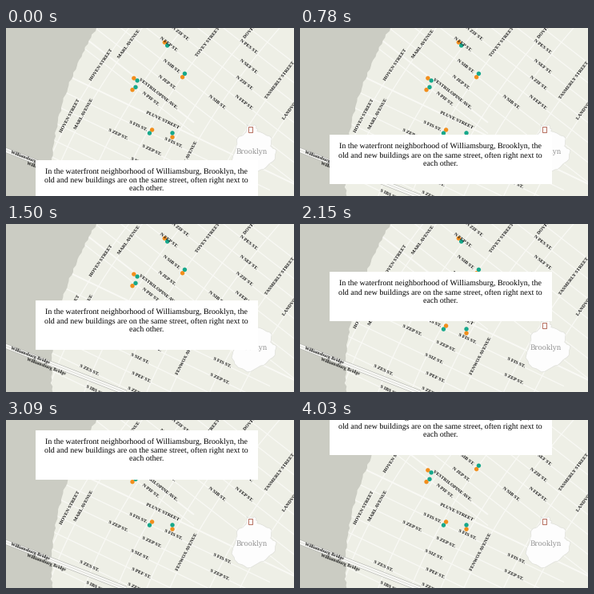
Recreate the animation shown at these times as a matplotlib script. Size 360x211 px, loop 4.05 s.

```python
import math

import numpy as np
import matplotlib.pyplot as plt
from matplotlib.animation import FuncAnimation
from matplotlib.patches import Circle, Polygon, Rectangle

W, H, DPI = 360, 211, 100
LOOP, TICK, STEPS = 4050, 10, 56
PX = 72 / DPI

LAND, WATER, ROAD, INK = "#eeefe6", "#cbccc3", "#f9f9f5", "#1a1a1a"
ORANGE, TEAL = "#f28e1c", "#17a88b"

plt.rcParams["text.hinting"] = "none"
rng = np.random.default_rng(4)
fig = plt.figure(figsize=(W / DPI, H / DPI), dpi=DPI, facecolor=LAND)
ax = fig.add_axes([0, 0, 1, 1])
ax.set_xlim(0, W)
ax.set_ylim(H, 0)
ax.axis("off")


def line(x, y, color=ROAD, width=1.3, z=1):
    ax.plot(x, y, color=color, lw=width * PX, zorder=z,
            solid_capstyle="butt")


def label(text, x, y, angle=0, size=6.0, family="Liberation Serif",
          weight="bold", color=INK, z=5):
    ax.text(x, y, text, rotation=angle, size=size * PX, family=family,
            weight=weight, color=color, ha="center", va="center",
            rotation_mode="anchor", zorder=z)


def avenue_x(u, y):
    """Avenues share one bend and fan out with their distance u inland."""
    return 153.5 - 0.77 * y + 0.00103 * y**2 + u * (39 - 0.02 * y)


def avenue(u, name="", ys=()):
    y = np.linspace(-5, H + 5, 30)
    line(avenue_x(u, y), y)
    for at in ys:
        run = avenue_x(u, at - 0.5) - avenue_x(u, at + 0.5)
        label(name, avenue_x(u, at), at, math.degrees(math.atan2(1, run)))


def street(slope, base, name, xs, start, end, width=1.3):
    x = np.array([start, end])
    line(x, base + slope * x, width=width)
    for at in xs:
        label(name, at, base + slope * at, -math.degrees(math.atan(slope)))


def north(lane, name="", xs=(), start=80, end=365, width=1.3):
    street(0.78, -12 - 25 * lane, name, xs, start, end, width)


def south(lane, name="", xs=(), end=330, width=1.3):
    street(0.48, 23 + 22.3 * lane, name, xs, 40, end, width)


avenue(0, "HOVEN STREET", [47, 111])
avenue(0.43, "MARL AVENUE", [21, 108])
avenue(1.75)
avenue(2.92, "TOVEY STREET", [18])
avenue(4.0, "DOVFELD AVENUE", [-8])
avenue(4.83, "FENWOX AVENUE", [166])
avenue(6.26, "TASMERLY STREET", [66])
avenue(7.35, "LANDVOKER STREET", [89])

north(1.55, "N PIF ST.", [180], 95, 235)
north(2.1, "VESTRILOPINE AVE.", [190], 95, 235, 2)
north(3, "N JEP ST.", [200])
north(4, "N SIB ST.", [206, 263])
north(5, "N FEP ST.", [202, 296])
north(6, "N ZIF ST.", [217, 297])
north(7, "N SEF ST.", [302])
north(8, "N PES ST.", [302])
north(9)

south(0, "PLUVE STREET", [195], 365, 2)
south(1, "S FIS ST.", [164, 208, 269])
south(2, "S ZEP ST.", [139, 181, 266])
south(3, "S SIZ ST.", [167])
south(4, "S PEF ST.", [168])
south(5, "S ZES ST.", [103, 163])
south(6, "S IBS ST.", [111])

# River with a ragged bank
bank_y = np.arange(-4, H + 5, 4)
bank_x = 113 - 0.6 * bank_y + 0.0016 * bank_y**2
bank_x += rng.uniform(-1.3, 1.3, bank_y.size)
bank = [(0, -4), *zip(bank_x, bank_y), (0, H + 4)]
ax.add_patch(Polygon(bank, fc=WATER, ec="none", zorder=2))

# Bridge
deck = np.array([-2, 165])
for color, width in [("#b4b5b0", 6.4), ("#f8f8f5", 5.2), ("#d3d4cf", 0.7)]:
    line(deck, 153.5 + 0.39 * deck, color, width, 3)
for x, y in [(30, 165), (50.5, 179)]:
    label("Williamsburg Bridge", x, y, -21, 5.8)

# Building pairs: centre and direction from the orange dot to the teal one
PAIRS = [(200, 20, 50), (222, 59.5, -57), (162, 64.5, 35),
         (160, 76, -40), (181, 130, 127), (208, 134.5, -90)]
for x, y, angle in PAIRS:
    a = math.radians(angle)
    for side, color in [(-1, ORANGE), (1, TEAL)]:
        spot = x + side * 2.6 * math.cos(a), y + side * 2.6 * math.sin(a)
        ax.add_patch(Circle(spot, 2.7, fc=color, ec="none", zorder=4))

# Locator inset: a few corners joined by a ragged coast
CORNERS = np.array([(301, 122), (311, 122), (315, 130), (332, 138),
                    (331, 149), (338, 153), (336, 166), (320, 178),
                    (303, 186), (288, 178), (281, 168), (287, 150),
                    (290, 137), (300, 132), (301, 122)])
t = np.linspace(0, len(CORNERS) - 1, 4 * len(CORNERS))
coast = np.column_stack([np.interp(t, range(len(CORNERS)), c)
                         for c in CORNERS.T])
coast += rng.uniform(-0.9, 0.9, coast.shape)
ax.add_patch(Polygon(coast, fc="#fdfdfd", ec="#dcddd7", lw=0.6 * PX,
                     zorder=6))
ax.add_patch(Rectangle((302.5, 123.5), 5, 7, fc="none", ec="#b0614f",
                       lw=0.9 * PX, zorder=7))
label("Brooklyn", 307, 156, 0, 8.7, "DejaVu Serif", "normal", "#929292", 7)

# Caption card
CAPTION = ["In the waterfront neighborhood of Williamsburg, Brooklyn, the",
           "old and new buildings are on the same street, often right next to",
           "each other."]
card = ax.add_patch(Rectangle((37, 165), 278, 62, fc="white", ec="none",
                              zorder=8))
rows = [ax.text(175.3, 0, row, size=10 * PX, family="Liberation Serif",
                color="black", ha="center", va="baseline", zorder=9)
        for row in CAPTION]


def card_top(step):
    return np.interp(step, [0, 6, 16, 21, 30, 43, 56],
                     [165.5, 148.5, 120, 96, 60, 12.5, -18])


def update(i):
    # The page redraws in discrete scroll steps
    step = (i * TICK + 16) * STEPS // (LOOP - 20)
    top = card_top(step)
    card.set_y(top)
    for n, row in enumerate(rows):
        row.set_y(top + 17 + 11.4 * n)
    return [card, *rows]


anim = FuncAnimation(fig, update, frames=LOOP // TICK, interval=TICK,
                     repeat=True, repeat_delay=0, blit=False)
plt.show()
```
